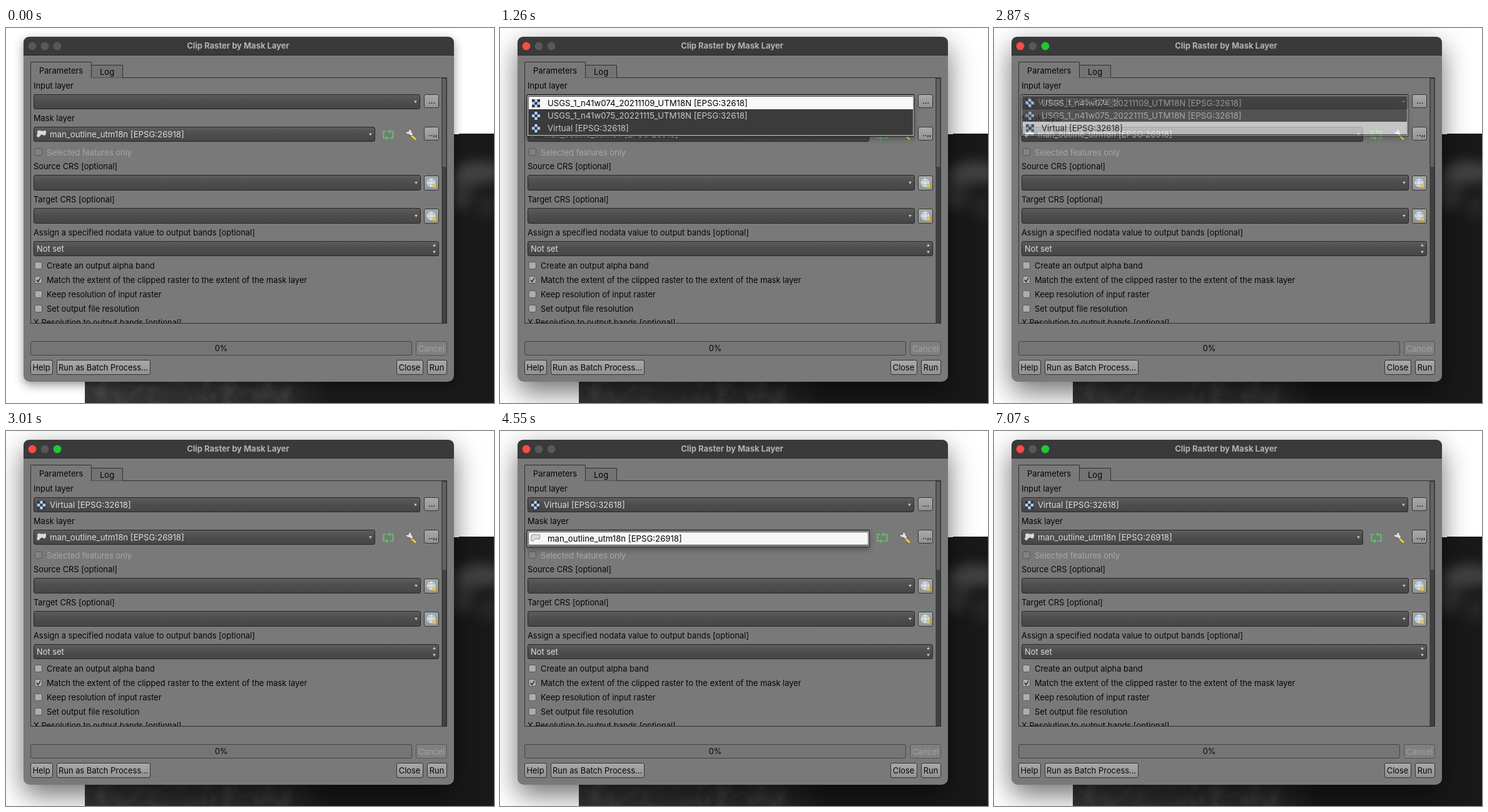
Animation, 780 px wide and 600 px high, one loop 8000 ms. Source, as an HTML page:

```html
<!DOCTYPE html>
<html lang="en">
<head>
<meta charset="utf-8">
<title>Clip Raster by Mask Layer</title>
<style>
  html, body { margin: 0; width: 100%; height: 100%; overflow: hidden; background: #fff; }
  svg { display: block; width: 780px; height: 600px; }
  text { font: 12.87px Inter, Roboto, sans-serif; white-space: pre; }
  .layer { font-size: 13.2px; }
  .title { font-size: 13px; font-weight: 700; }
  .window { filter: drop-shadow(0 5px 8px rgba(0,0,0,.42)); }
  .active .window { filter: drop-shadow(0 16px 22px rgba(0,0,0,.56)); }
</style>
</head>
<body>
<svg id="stage" viewBox="0 0 780 600" xmlns="http://www.w3.org/2000/svg"></svg>
<script>
const stage = document.getElementById('stage');
const BODY = '#797979', LIGHT = '#dedede', LINE = '#303030';

// Text is placed by its left edge and the middle of its capitals.
const text = (x, y, str, fill = '#050505', attrs = '') =>
  `<text x="${x}" y="${y + 4.6}" fill="${fill}" ${attrs}>${str}</text>`;

const box = (x1, y1, x2, y2, fill, stroke = 'none', r = 0, attrs = '') =>
  `<rect x="${x1}" y="${y1}" width="${x2 - x1}" height="${y2 - y1}" rx="${r}" fill="${fill}" stroke="${stroke}" ${attrs}/>`;

const path = (d, fill, stroke = 'none', width = 1) =>
  `<path d="${d}" fill="${fill}" stroke="${stroke}" stroke-width="${width}"/>`;

const arrow = (x, y, dir = 1) =>
  path(`M${x - 2.3} ${y - 1.7 * dir}h4.6l-2.3 ${3.6 * dir}z`, '#d2d2d2');

const combo = (x2, y1, y2) =>
  box(44.5, y1 + .5, x2 - .5, y2 - .5, 'url(#comboFill)', '#272727', 2.5) +
  arrow(x2 - 7.5, (y1 + y2) / 2 + .3);

const button = (x1, y1, x2, y2) =>
  box(x1 + .5, y1 + .5, x2 - .5, y2 - .5, 'url(#buttonFill)', '#353535', 2.5);

const labelButton = (x1, x2, label) =>
  button(x1, 531, x2, 555) +
  text((x1 + x2) / 2 - .4, 543.4, label, undefined, 'text-anchor="middle"');

const checkbox = (y, label, checked) =>
  box(46, y - 5.7, 57.5, y + 5.6, '#adadad', '#555', 2.5) +
  (checked ? path(`M48.8 ${y}l2.5 3.1 4-6.6`, 'none', '#151515', 1.3) : '') +
  text(65, y, label);

const rasterIcon = (x, y) =>
  box(x - 6.5, y - 6.5, x + 6.5, y + 6.5, '#2d3746') +
  [[0, -1], [-1, 0], [1, 0], [0, 1]].map(([i, j]) =>
    box(x + i * 4.3 - 2.2, y + j * 4.3 - 2.2, x + i * 4.3 + 2.2, y + j * 4.3 + 2.2, '#b5d0ee')).join('');

const polygonIcon = (y, fill, stroke) =>
  path(`M50 ${y - 4}q2-3 6-1q4 1 7-1q2 3 0 8q-3 1-5-1q-3 0-5 4q-3 1-4-2q2-3 1-7z`, fill, stroke);

const globeButton = y =>
  button(668, y - 12, 692, y + 12) +
  `<circle cx="679.5" cy="${y - .5}" r="7" fill="#d9e1e7" stroke="#a3b2bd" stroke-width=".8"/>` +
  path(`M673 ${y - 3.5}h13M673 ${y + 2.5}h13M677 ${y - 7}q-3 6 0 12M682 ${y - 7}q3 6 0 12`, 'none', '#9fb2c2', .8) +
  path(`M680 ${y + 7.5}l7.5-8v8z`, '#e8c83c', '#b49a32', .5);

const light = (x, id) => `<circle id="${id}" cx="${x}" cy="29" r="6.4" fill="#585858"/>`;

const inputRows = [
  'USGS_1_n41w074_20211109_UTM18N [EPSG:32618]',
  'USGS_1_n41w075_20221115_UTM18N [EPSG:32618]',
  'Virtual [EPSG:32618]'
];
const maskName = 'man_outline_utm18n [EPSG:26918]';

// A menu frame around rows that span y1 to y2.
const popupFrame = (x2, y1, y2) =>
  box(43, y1 - 3.5, x2, y2 + 3.5, '#3b3b3b', '#1f1f1f', 1, 'filter="url(#popupShadow)"') +
  box(44.5, y1 - 1.7, x2 - 1.2, y2 + 2, '#3b3b3b', '#d6d6d6', 0, 'stroke-width="1.1"');

stage.innerHTML = `
<defs>
  <linearGradient id="comboFill" x2="0" y2="1"><stop stop-color="#5d5d5d"/><stop offset=".5" stop-color="#4d4d4d"/><stop offset="1" stop-color="#464646"/></linearGradient>
  <linearGradient id="buttonFill" x2="0" y2="1"><stop stop-color="#a9a9a9"/><stop offset="1" stop-color="#929292"/></linearGradient>
  <linearGradient id="mapFade"><stop stop-color="#343434"/><stop offset=".5" stop-color="#282828"/><stop offset=".6" stop-color="#191919"/><stop offset="1" stop-color="#191919"/></linearGradient>
  <filter id="blur" x="-50%" y="-50%" width="200%" height="200%"><feGaussianBlur stdDeviation="9"/></filter>
  <filter id="popupShadow" x="-5%" y="-40%" width="110%" height="200%"><feDropShadow dx="0" dy="4" stdDeviation="4" flood-opacity=".3"/></filter>
  <filter id="relief" x="0" y="0" width="1" height="1">
    <feTurbulence type="fractalNoise" baseFrequency=".035" numOctaves="4" seed="7"/>
    <feColorMatrix values="0 0 0 0 .5  0 0 0 0 .5  0 0 0 0 .5  2.4 0 0 0 -1"/>
  </filter>
  <clipPath id="mapClip"><path d="M126 560H710V170h14v-1h56v431H126z"/></clipPath>
  <clipPath id="panelClip"><path d="M40 80h656v392H40z"/></clipPath>
</defs>
<g clip-path="url(#mapClip)">
  ${box(126, 168, 780, 600, 'url(#mapFade)')}
  <g filter="url(#blur)" fill="#5a5a5a">
    <ellipse cx="757" cy="231" rx="40" ry="18" opacity=".6"/>
    <ellipse cx="728" cy="262" rx="20" ry="30" opacity=".35"/>
    <ellipse cx="770" cy="285" rx="16" ry="20" opacity=".18"/>
  </g>
  ${box(126, 560, 480, 600, '#fff', 'none', 0, 'filter="url(#relief)" opacity=".12"')}
</g>

${box(28, 14, 716, 566, BODY, 'none', 10, 'class="window"')}
${path('M28 43V24q0-10 10-10H706q10 0 10 10V43z', '#3a3a3a')}
${path('M28 43.5H716', 'none', '#252525')}
${light(42, 'red')}${light(62, 'yellow')}${light(82, 'green')}
${text(371, 28.5, 'Clip Raster by Mask Layer', '#b2b2b2', 'class="title" text-anchor="middle"')}

${box(39.5, 79.5, 704.5, 472.5, BODY, LINE)}
${path('M136.5 79.5V59.5H186.5V79.5', '#737373', LINE)}
${path('M39.5 81V54.5H136.5V79.5', BODY, LINE)}
${path('M40 79.5H136', 'none', BODY, 2)}
${text(53, 68, 'Parameters', undefined, 'style="font-size:13px"')}
${text(150, 70.6, 'Log', undefined, 'style="font-size:13px"')}
${box(697, 80, 704, 472, '#414141', '#303030')}
${box(697, 80.5, 704, 223, '#626262', '#353535', 1)}

${text(44, 92, 'Input layer')}
${combo(662, 106, 130)}
<g id="inputValue">${rasterIcon(56.5, 118.5)}${text(70, 118, inputRows[2], LIGHT, 'class="layer"')}</g>
${button(668, 106, 692, 128)}
${text(675, 116, '...', undefined, 'font-weight="600"')}

${text(44, 144.5, 'Mask layer')}
${combo(590, 158, 182)}
${polygonIcon(169.5, '#dadada', 'none')}
${text(70, 170, maskName, LIGHT, 'class="layer"')}
${path('M608 165.5h-4.500v10.500h5M614 176h4.500v-10.500h-5', 'none', '#62bd6a', 2.2)}
${path('M608 172.300v7.400l4-3.700zM614 161.800v7.400l-4-3.700z', '#62bd6a')}
${path('M645 169l10 9.500', 'none', '#6b5a22', 4.6)}
${path('M647 171l8 7.500', 'none', '#e5cc62', 3.2)}
${path('M638.500 165.500l4 .5 1.500-1.500-.5-3q5 .5 5 5l2.500 3.500-3 3-3.500-2.500q-5 0-6-5z', '#dedede', '#444', .8)}
${button(668, 158, 692, 180)}
${text(675, 168.5, '..,,', undefined, 'font-weight="600"')}

${box(46, 193, 57.5, 204, '#828282', '#555', 2.5)}
${text(65, 199, 'Selected features only', '#a7a7a7')}
${text(44, 221.5, 'Source CRS [optional]')}
${combo(663, 235, 260)}${globeButton(248)}
${text(44, 274.5, 'Target CRS [optional]')}
${combo(663, 288, 313)}${globeButton(301)}
${text(44, 327.5, 'Assign a specified nodata value to output bands [optional]')}
${box(44.5, 341.5, 691.5, 364.5, 'url(#comboFill)', '#272727', 2.5)}
${text(49, 353, 'Not set', LIGHT)}${arrow(684.5, 347.5, -1)}${arrow(684.5, 358.5)}
${checkbox(380, 'Create an output alpha band')}
${checkbox(403, 'Match the extent of the clipped raster to the extent of the mask layer', true)}
${checkbox(426, 'Keep resolution of input raster')}
${checkbox(449, 'Set output file resolution')}
<g clip-path="url(#panelClip)">${text(44, 471, 'X Resolution to output bands [optional]')}</g>

${box(39.5, 501.5, 648.5, 523.5, '#757575', '#444', 2.5)}
${text(344, 512, '0%', undefined, 'text-anchor="middle"')}
${box(655.5, 501.5, 704.5, 523.5, '#808080', '#555', 2.5)}
${text(680, 513.4, 'Cancel', '#a2a2a2', 'text-anchor="middle"')}
${labelButton(39, 75, 'Help')}
${labelButton(81, 231, 'Run as Batch Process…')}
${labelButton(624, 667, 'Close')}
${labelButton(673, 705, 'Run')}

<g id="inputPopup">
  ${popupFrame(662, 110, 170)}
  ${inputRows.map((name, i) => `<g class="row">
    ${box(46, 110 + 20 * i, 660, 130 + 20 * i, 'none')}
    ${rasterIcon(57.5, 120.5 + 20 * i)}
    ${text(76, 120 + 20 * i, name, LIGHT, 'class="layer"')}
  </g>`).join('')}
</g>
<g id="maskPopup">
  ${popupFrame(590.5, 162, 182)}
  ${box(46, 162, 588, 182, '#f6f6f6')}
  ${polygonIcon(171, '#dedede', '#8c8c8c')}
  ${text(76, 172.5, maskName, '#050505', 'class="layer"')}
</g>`;

const byId = id => document.getElementById(id);
const rows = [...document.querySelectorAll('.row')];

// Each track holds [start time, value] pairs.
const tracks = {
  input: [[0, 0], [490, 1], [2870, .6], [2940, .28], [3010, 0]],
  row: [[0, -1], [1260, 0], [1680, 1], [1820, 2]],
  mask: [[0, 0], [4550, 1], [5530, .55], [5600, 0]],
  green: [[0, 0], [2870, 1], [4550, 0], [5530, 1]]
};
const valueAt = (track, t) => track.filter(([start]) => start <= t).pop()[1];

function show(t) {
  const active = t >= 490;
  const selected = valueAt(tracks.row, t);
  stage.classList.toggle('active', active);
  byId('red').setAttribute('fill', active ? '#fb4b45' : '#585858');
  byId('green').setAttribute('fill', valueAt(tracks.green, t) ? '#22c63c' : '#585858');
  byId('inputValue').setAttribute('opacity', t >= 2870 ? 1 : 0);
  byId('inputPopup').setAttribute('opacity', valueAt(tracks.input, t));
  byId('maskPopup').setAttribute('opacity', valueAt(tracks.mask, t));
  rows.forEach((row, i) => {
    row.querySelector('rect').setAttribute('fill', i === selected ? '#f8f8f8' : 'none');
    row.querySelector('text').setAttribute('fill', i === selected ? '#050505' : '#c9c9c9');
  });
}

const begin = performance.now();
function tick() {
  show((performance.now() - begin) % 8000);
  requestAnimationFrame(tick);
}
tick();
</script>
</body>
</html>
```
